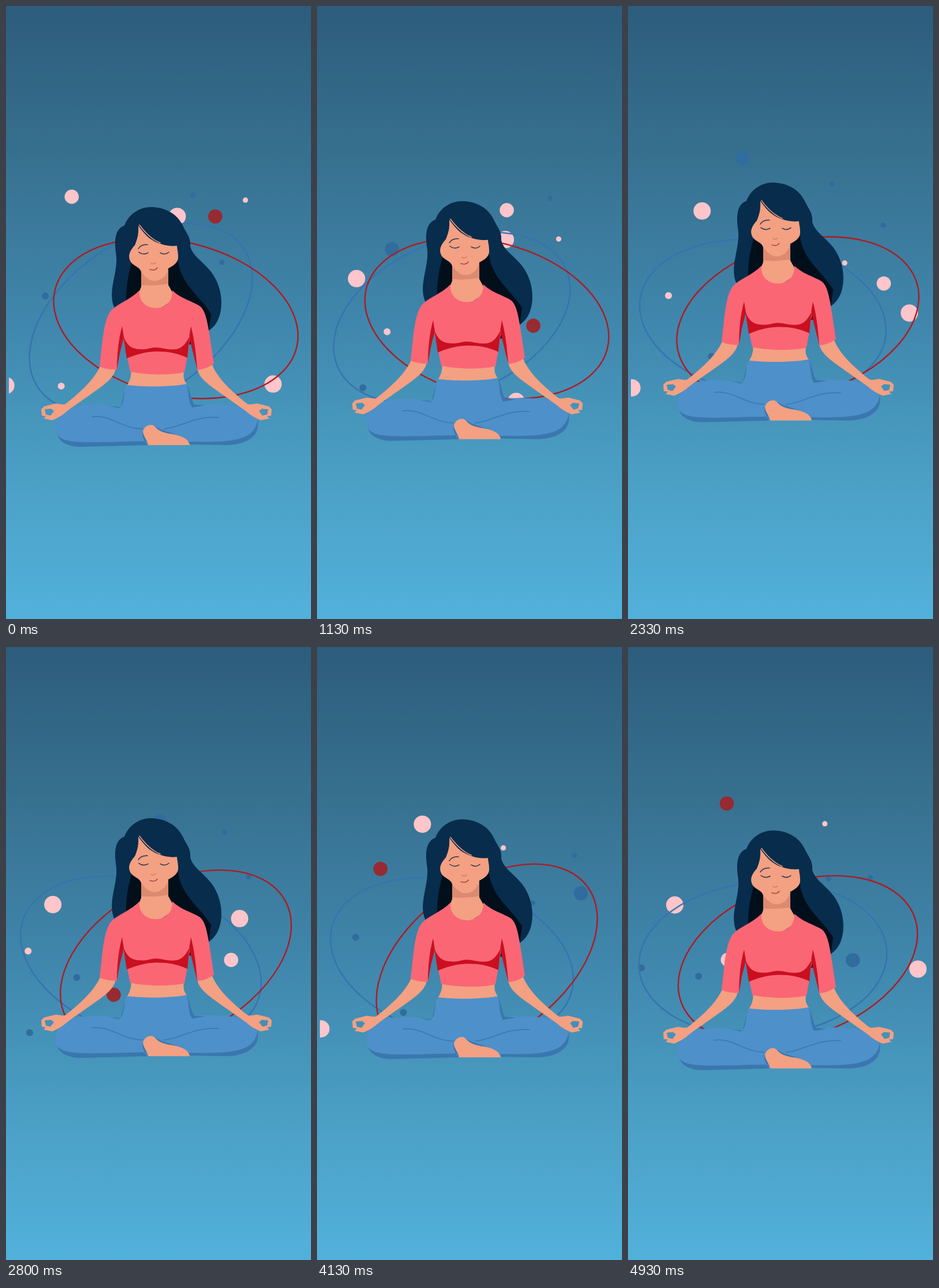
These frames come from a looping animation (528x1061 px, 4.99 s). An HTML page:

```html
<!DOCTYPE html>
<html lang="en">
<head>
<meta charset="utf-8">
<title>Meditation</title>
<style>
  html, body { margin: 0; width: 100%; height: 100%; overflow: hidden; }
  body { background: linear-gradient(#2d5c7c, #37708f 24%, #4087ad 52%, #4ca2c8 80%, #52b1db); }
  svg { display: block; width: 100%; height: 100%; }
  .line { fill: none; stroke-width: 1.5; stroke-linecap: round; }
  .skin { fill: #f4a082; }
  .hair { fill: #072c4c; }
  .deep { fill: #010f1b; }
  .shirt { fill: #fb6675; }
  .fold { fill: #c90f20; }
  .pants { fill: #4e90c9; }
  .shade { fill: #3a77ae; }
</style>
</head>
<body>
<svg viewBox="0 0 528 1061">
  <defs>
    <clipPath id="stage"><rect x="5" width="512" height="1061"/></clipPath>
    <path id="outer" d="M504 572C504 525 443 499 407 472S318 405 299 369S240 285 191 303S90 400 80 451S-40 500 -40 565S-30 640 5 660S244 678 332 684S512 650 504 572"/>
    <path id="middle" d="M183 592C172 535 160 470 133 426S100 372 112 335S165 263 205 263S295 345 338 357S452 393 458 431S405 533 375 553S355 620 341 655S197 650 183 592"/>
    <path id="left" d="M133 648C175 628 130 592 123 573S134 536 126 522S92 500 77 500S36 520 25 551S-45 590 -45 630S0 675 38 668S115 656 133 648"/>
    <path id="right" d="M439 346C448 356 448 372 441 380S423 388 419 401S420 428 411 437S385 452 374 444S352 415 346 398S326 370 323 351S326 304 344 306S366 316 376 320S405 336 416 336S434 341 439 346"/>
  </defs>
  <g id="dots" clip-path="url(#stage)"></g>
  <g fill="none" stroke-width="2.4">
    <ellipse id="blueRing" rx="215" ry="133" stroke="#3673b0"/>
    <ellipse id="redRing" rx="215" ry="133" stroke="#b01a1f"/>
  </g>
  <g id="figure">
    <path class="hair" d="M205 379C212 360 230 347 252 347C282 348 299 364 306 379C313 394 320 399 319 415C323 432 341 441 355 459C371 480 376 507 371 530C367 548 358 556 351 561L320 540L200 527L188 522C182 510 182 495 186 475C190 455 193 440 190 425C187 402 190 384 205 379Z"/>
    <path class="deep" d="M219 438C212 462 207 485 208 518L245 495L238 450ZM297 429C297 478 336 500 355 532L351 561L325 540L280 495L281 452ZM316 565L322 570L320 584L316 586Z"/>
    <path class="skin" d="M234 445V485L226 505L255 530L294 505L281 482V445Z"/>
    <path fill="#dc8a70" d="M234 458L281 454V480Q258 484 234 482Z"/>
    <path class="skin" d="M229 379C230 395 227 403 223 413C214 423 210 432 216 442C222 450 231 450 234 459C242 470 250 475 258 475C270 474 279 465 281 453C291 448 299 442 298 432C298 424 296 419 296 414C285 415 276 414 266 410C248 404 240 394 229 379Z"/>
    <path class="line" stroke="#f4a082" stroke-width="1" d="M231 378C242 393 254 404 267 409"/>
    <g class="line" stroke="#253853">
      <path d="M229 419Q234 411 245 412"/>
      <path d="M230 425Q238 431 246 426M267 426Q275 431 282 425"/>
      <path stroke="#d97a68" d="M251 444Q256 447 259 443"/>
      <path stroke="#a84545" d="M249 455Q258 458 262 452"/>
    </g>
    <path class="skin" d="M216 626C218 640 214 648 209 657C240 662 290 660 314 655C307 645 306 640 309 626Z"/>
    <path class="pants" d="M209 655C240 659 290 658 313 653C320 668 320 680 326 689C360 686 395 689 415 696C432 703 439 720 434 736C428 752 410 758 385 759L320 757L244 759L128 762C102 761 84 746 86 725C88 705 105 693 135 690C165 688 190 690 198 695C203 680 203 668 209 655Z"/>
    <path class="shade" d="M88 740C98 757 130 755 242 752L246 759L128 762C103 761 92 752 88 740ZM316 753C390 755 425 751 434 722L436 716C440 745 415 757 385 759L318 758ZM313 653C317 668 315 682 322 694L345 690L326 689C319 678 320 668 313 653ZM206 665C203 680 204 690 195 695L178 691L198 693C202 683 202 675 206 665ZM237 734C234 744 240 752 245 759L250 759L247 745ZM257 725C268 738 310 738 319 757L304 746L265 738Z"/>
    <path class="line" stroke="#3a77ae" d="M149 710C182 706 200 730 236 731M274 731C305 728 325 708 368 711"/>
    <path class="skin" d="M246 759C245 751 237 743 237 735C240 725 250 721 257 726C263 734 272 738 288 740C307 743 317 750 318 759Z"/>
    <path id="arm" class="skin" fill-rule="evenodd" d="M164 620L190 626C186 648 165 657 106 700C98 707 90 712 80 716L65 713L69 709L62 708L61 697L66 692L86 687C95 688 101 690 104 687C128 668 154 645 164 620ZM67 697L69 706L77 708L83 700L78 696Z"/>
    <use href="#arm" transform="translate(521) scale(-1 1)"/>
    <path class="shirt" d="M231 491C227 531 290 533 288 491C300 504 322 510 335 518C348 527 350 555 360 618Q348 627 332 629C326 605 322 580 320 556C319 582 313 610 309 633C280 639 240 637 215 632C210 605 203 580 201 556C197 585 196 605 192 628Q175 629 162 623C167 585 168 537 185 523C198 512 217 506 231 491Z"/>
    <path class="fold" d="M201 553L204 572L197 600L192 628C192 600 195 575 201 553ZM320 553L317 572L324 600L331 628C329 600 326 575 320 553ZM203 570C210 588 218 592 230 593C245 594 250 590 259 590C270 590 280 595 295 593C305 591 312 583 318 570L314 608C298 600 280 597 262 597C242 597 225 602 209 609Z"/>
  </g>
</svg>
<script>
const LOOP = 4990, STEP = 200 / 3, CYCLE = 100 * STEP;
const PINK = '#fec5ca', BLUE = '#316c9e', RED = '#982a32';
const byId = id => document.getElementById(id);

// Every dot circles its route at constant speed, ahead of the clock by its lead in ms
const dots = [];
function addDots(routeId, radius, ...riders) {
  const route = byId(routeId), length = route.getTotalLength();
  for (const [color, lead] of riders) {
    const node = document.createElementNS('http://www.w3.org/2000/svg', 'circle');
    node.setAttribute('r', radius);
    node.setAttribute('fill', color);
    byId('dots').append(node);
    dots.push({ node, route, length, lead });
  }
}
addDots('left', 6, [PINK, 0], [BLUE, -1760], [BLUE, -3870]);
addDots('right', 4.6, [PINK, 0], [BLUE, -1760], [BLUE, -3870]);
addDots('middle', 12.3, [BLUE, -100], [PINK, 2030], [RED, -2860]);
addDots('outer', 15, [PINK, -2130], [PINK, 0], [PINK, 1800]);

const wave = (time, peak, middle, size) =>
  middle + size * Math.cos(2 * Math.PI * (time - peak) / CYCLE);

function draw(now) {
  const step = Math.floor((now % LOOP + 4) / STEP);
  const time = step < 2 ? -440 : step * STEP; // opening pose holds, then jumps
  for (const { node, route, length, lead } of dots) {
    const turn = (time + lead) / CYCLE;
    const { x, y } = route.getPointAtLength((turn - Math.floor(turn)) * length);
    node.setAttribute('cx', x);
    node.setAttribute('cy', y);
  }
  const place = (id, transform) => byId(id).setAttribute('transform', transform);
  place('redRing', `translate(294 541) rotate(${wave(time, 365, -8.3, 29.7)})`);
  place('blueRing', `translate(233.5 540) rotate(${wave(time, 45, -7.3, -30)})`);
  place('figure', `translate(0 ${wave(time, 75, -25.5, 30)})`);
}

function tick() {
  draw(performance.now());
  requestAnimationFrame(tick);
}
tick();
</script>
</body>
</html>
```
